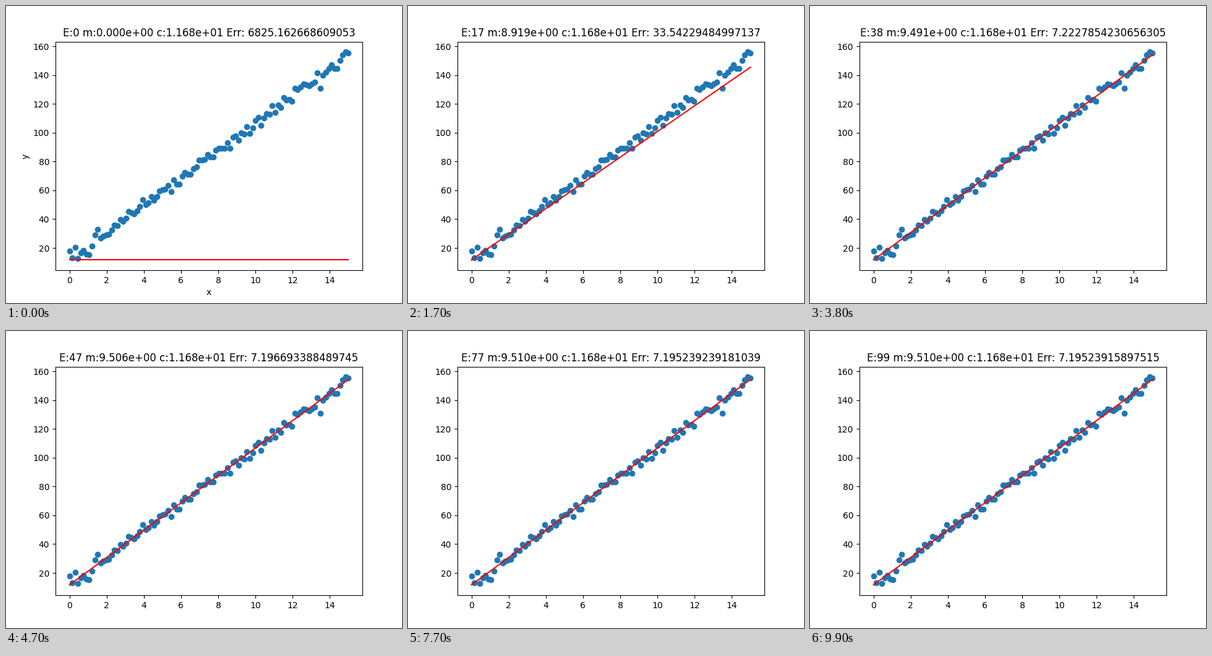
A matplotlib script for the animation above (10000 ms loop, 640x480 px).

```python
import matplotlib.pyplot as plt
import numpy as np
from matplotlib.animation import FuncAnimation

EPOCHS = 100
RATE = 0.001
INTERCEPT = 11.68
FIRST_ERR, LAST_ERR = 6825.162668609053, 7.19523915897515

x = np.linspace(0, 15, 100)

# Gradient descent on the slope alone shrinks its error by a fixed factor.
power = np.mean(x ** 2)
shrink = 1 - 2 * RATE * power
last_q = shrink ** (2 * (EPOCHS - 1))
best_slope = np.sqrt((FIRST_ERR - LAST_ERR) / power)

# Noisy samples around the best line, with the most visible outliers pinned.
rng = np.random.default_rng(3)
noise = rng.normal(0, 2.2, x.size).clip(-4.5, 4.5)
outliers = {0: 6.1, 1: 0.1, 2: 5.8, 3: -3.4, 7: -6.5, 10: 6.9,
            89: -9.1, 98: 3.1, 99: 1.0}
noise[list(outliers)] = list(outliers.values())
y = best_slope * x + INTERCEPT + noise


def slope_at(epoch):
    return best_slope * (1 - shrink ** epoch)


def error_at(epoch):
    q = shrink ** (2 * epoch)
    return float(LAST_ERR + (FIRST_ERR - LAST_ERR) * ((q - last_q) / (1 - last_q)))


fig, ax = plt.subplots(figsize=(6.4, 4.8), dpi=100)
ax.scatter(x, y)
line, = ax.plot(x, np.full_like(x, INTERCEPT), color="red")


def update(epoch):
    m = slope_at(epoch)
    line.set_ydata(m * x + INTERCEPT)
    ax.set_title(f"E:{epoch} m:{m:.3e} c:{INTERCEPT:.3e} Err: {error_at(epoch)}")
    # Axis labels only show before training starts.
    ax.set_xlabel("x" if epoch == 0 else "")
    ax.set_ylabel("y" if epoch == 0 else "")
    return line,


anim = FuncAnimation(fig, update, frames=EPOCHS, interval=100,
                     init_func=lambda: update(0), repeat=True, repeat_delay=0)
plt.show()
```
